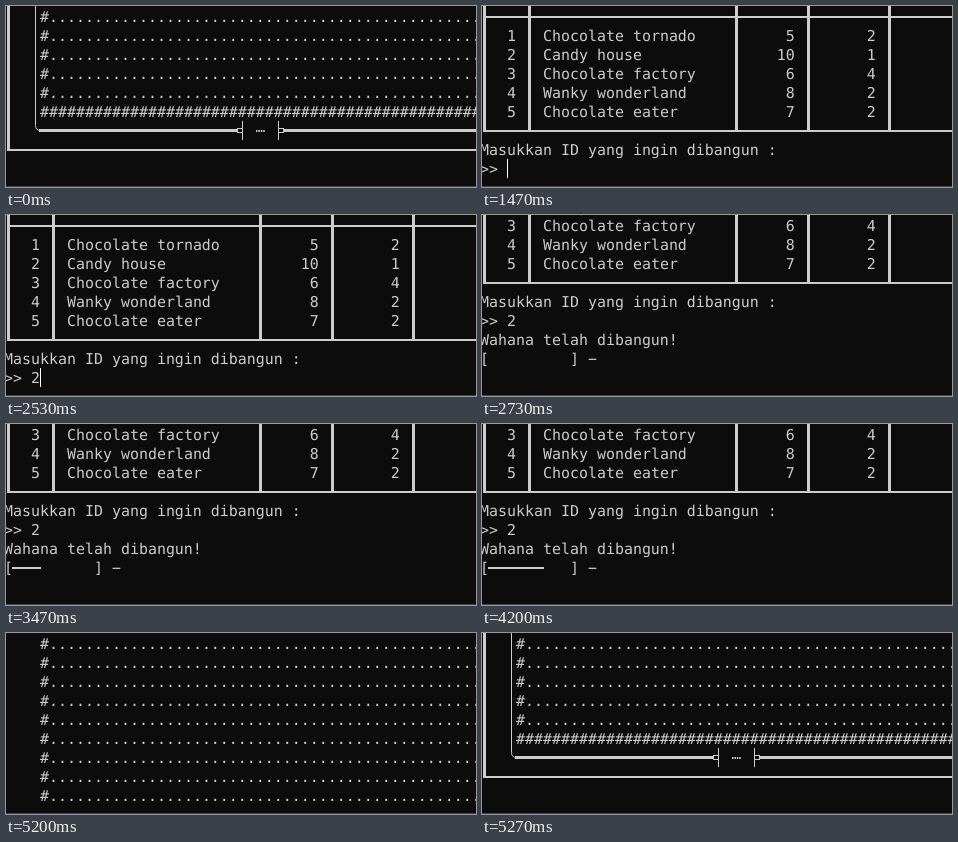
These frames come from a looping animation (470 by 181 pixels, 7.47 s). An HTML page:

```html
<!DOCTYPE html>
<html lang="id">
<head>
<meta charset="utf-8">
<title>Terminal</title>
<style>
  html, body { margin: 0; width: 100%; height: 100%; overflow: hidden; background: #0c0c0c; }
  svg { display: block; }
  text {
    font: 14.95px "DejaVu Sans Mono", "Noto Sans Mono", monospace;
    white-space: pre;
    text-rendering: geometricPrecision;
  }
  #screen { fill: #ccc; }
  .line { fill: none; stroke: #ccc; }

  .rows, .more, .frame, .menu, .typed, .done, .caret {
    animation: 7470ms step-end infinite;
  }
  .rows  { animation-name: rows; }
  .more  { animation-name: more; }
  .frame { animation-name: frame; }
  .menu  { animation-name: menu, scroll; }
  .typed { animation-name: typed; }
  .done  { animation-name: done, load; }
  .caret { animation-name: caret; }

  @keyframes rows {
    0%, 69.611%, 100% { visibility: visible; }
    19.678% { visibility: hidden; }
  }
  @keyframes more {
    0%, 70.548%, 100% { visibility: hidden; }
    69.611% { visibility: visible; }
  }
  @keyframes frame {
    0%, 70.548%, 100% { visibility: visible; }
    19.678% { visibility: hidden; }
  }
  @keyframes menu {
    0%, 69.611%, 100% { visibility: hidden; }
    19.678% { visibility: visible; }
  }
  @keyframes scroll {
    0%, 69.611%, 100% { transform: none; }
    36.546% { transform: translateY(-57px); }
  }
  @keyframes typed {
    0%, 69.611%, 100% { visibility: hidden; }
    33.868% { visibility: visible; }
  }
  @keyframes done {
    0%, 69.611%, 100% { visibility: hidden; }
    36.546% { visibility: visible; }
  }
  @keyframes caret {
    0%, 27.710%, 36.546%, 100% { visibility: hidden; transform: none; }
    19.678% { visibility: visible; transform: none; }
    33.868% { visibility: visible; transform: translateX(9px); }
  }
  /* --n counts the loaded cells */
  @keyframes load {
    0%      { --n: 0; }
    40.160% { --n: 1; }
    42.838% { --n: 2; }
    46.452% { --n: 3; }
    49.933% { --n: 4; }
    52.610% { --n: 5; }
    56.224% { --n: 6; }
    59.839% { --n: 7; }
    63.319% { --n: 8; }
    66.934%, 100% { --n: 9; }
  }
  .done { --n: 0; }
  .bar  { width: calc(9px * var(--n) + 2px * min(var(--n), 1)); }
  .spin { transform: translateX(calc(-18px * var(--n))); }
</style>
</head>
<body>
<svg id="screen" width="470" height="181" viewBox="0 0 470 181">
  <defs>
    <text id="row" x="34" y="16">#................................................</text>
  </defs>

  <g class="rows">
    <use href="#row"/>
    <use href="#row" y="19"/>
    <use href="#row" y="38"/>
    <use href="#row" y="57"/>
    <use href="#row" y="76"/>
  </g>
  <g class="more">
    <use href="#row" y="95"/>
    <use href="#row" y="114"/>
    <use href="#row" y="133"/>
    <use href="#row" y="152"/>
  </g>

  <g class="frame">
    <text x="34" y="111">#################################################</text>
    <path d="M1 0h3v143h466v2H1z"/>
    <path class="line" d="M29.5 0V119.5Q29.5 124.5 34.5 124.5"/>
    <path d="M33 123h199v3H33zM277 123h193v3H277z"/>
    <path class="line" d="M236.5 115v19M231 122.5h5.5M231 126.5h5.5M272.5 115v19M272.5 122.5h5.5M272.5 126.5h5.5"/>
    <path class="line" stroke-width="2" stroke-dasharray="1.5 .9" d="M250 125h9"/>
  </g>

  <g class="menu">
    <path d="M1 0h3v124h466v2H1zM2 10h468v2H2z"/>
    <path d="M46 0h3v125h-3zM253 0h3v125h-3zM325 0h3v125h-3zM406 0h3v125h-3z"/>
    <text x="25" y="35">1   Chocolate tornado          5        2</text>
    <text x="25" y="54">2   Candy house               10        1</text>
    <text x="25" y="73">3   Chocolate factory          6        4</text>
    <text x="25" y="92">4   Wanky wonderland           8        2</text>
    <text x="25" y="111">5   Chocolate eater            7        2</text>
    <text x="-2" y="149">Masukkan ID yang ingin dibangun :</text>
    <text x="-2" y="168">&gt;&gt;</text>
    <text class="typed" x="25" y="168">2</text>
    <rect class="caret" x="25" y="153" width="1" height="19" fill="#fff"/>
    <g class="done">
      <text x="-2" y="187">Wahana telah dibangun!</text>
      <text x="-2" y="206">[         ]</text>
      <rect class="bar" x="6" y="200" height="2"/>
      <svg x="106" y="191" width="9" height="19" overflow="hidden">
        <text class="spin" y="15">− \ / − \ / − \ / −</text>
      </svg>
    </g>
  </g>

  <rect y="180" width="470" height="1" fill="#444"/>
</svg>
</body>
</html>
```
